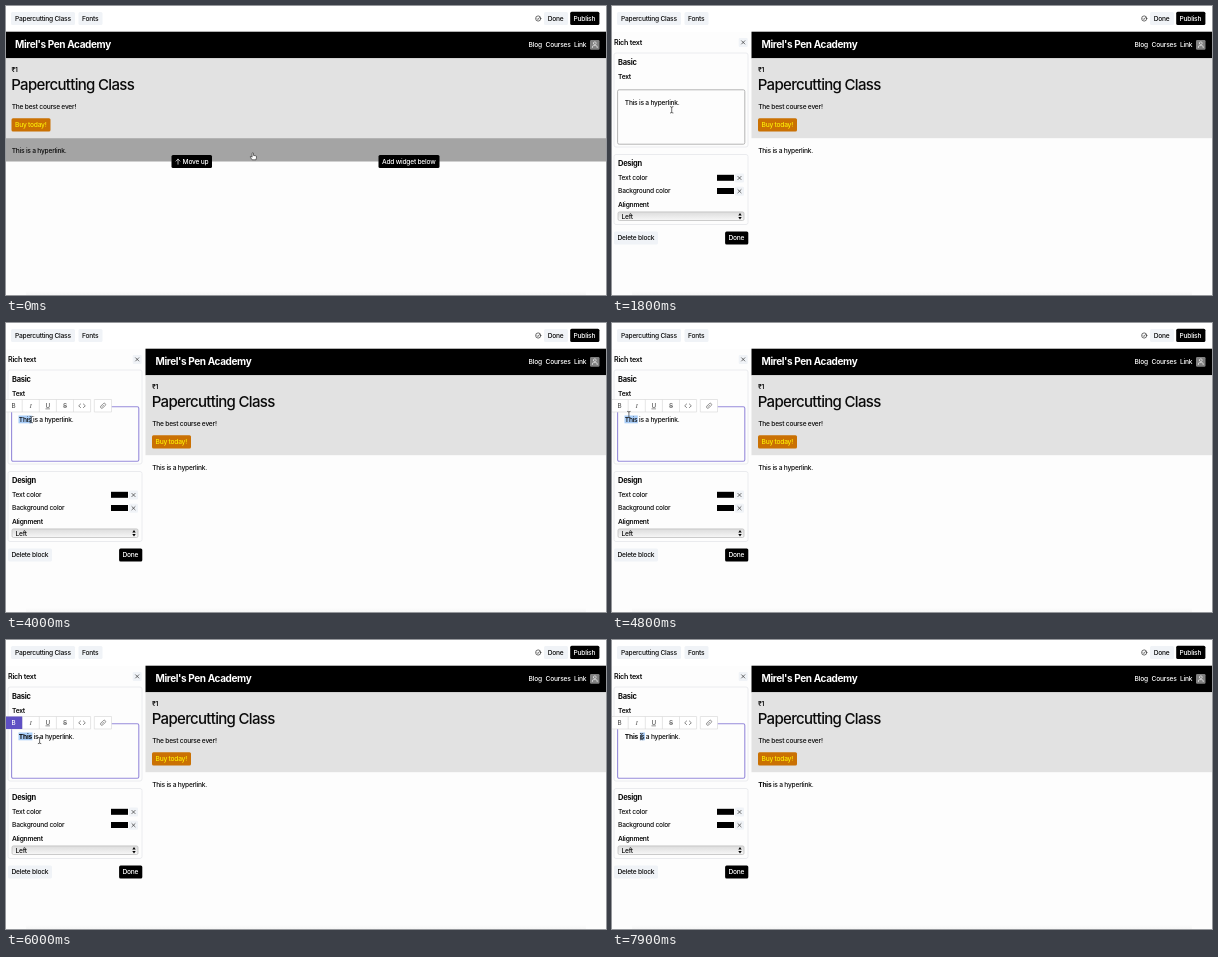
Recreate the animation shown at these times as an HTML page. Size 600 by 289 pixels, loop 8 s.

```html
<!DOCTYPE html>
<html lang="en">
<head>
<meta charset="utf-8">
<title>Page editor</title>
<style>
  html, body { margin: 0; width: 100%; height: 100%; overflow: hidden; background: #fdfdfd; }
  svg { display: block; width: 600px; height: 289px; }
  text { font: 500 6.67px Inter, "DejaVu Sans", sans-serif; letter-spacing: -.035em; fill: #0a0a0a; white-space: pre; }
  .w { fill: #fff; }
  .b { font-weight: 600; }
  .h { font-weight: 700; font-size: 7.5px; }
  .bold { font-weight: 700; }
  .brand { font-weight: 700; font-size: 10px; letter-spacing: -.038em; }
  .title { font-weight: 450; font-size: 15px; letter-spacing: -.045em; }
  .tip { font-size: 4.3px; font-weight: 600; }
  .chip { fill: #f0f3f7; }
  .card { fill: none; stroke: #e6e8eb; stroke-width: .8; }
  .line { fill: none; stroke: #333; stroke-width: .7; stroke-linecap: round; stroke-linejoin: round; }
  .tool { fill: none; stroke: #dcdcdc; stroke-width: .7; }
  .tools text { text-anchor: middle; fill: #555; font-size: 6.3px; }
  .tools .italic { font-family: "Liberation Serif", serif; font-style: italic; font-size: 7px; }
  .sel { fill: #a8cdf8; }
</style>
</head>
<body>
<svg viewBox="0 0 600 289">
  <defs>
    <linearGradient id="foot" x2="0" y2="1">
      <stop stop-color="#fdfdfd"/><stop offset="1" stop-color="#f6f6f6"/>
    </linearGradient>
    <linearGradient id="field" x2="0" y2="1">
      <stop stop-color="#dcdcdc"/><stop offset="1" stop-color="#f7f7f7"/>
    </linearGradient>
    <g id="clear">
      <rect class="chip" x="-4.5" y="-4.5" width="9" height="9" rx="1.2"/>
      <path class="line" d="M-1.6-1.6 1.6 1.6M1.6-1.6-1.6 1.6"/>
    </g>
  </defs>

  <rect width="600" height="289" fill="#fdfdfd"/>
  <rect x="20" y="285" width="560" height="4" fill="url(#foot)"/>

  <!-- top bar -->
  <rect width="600" height="26" fill="#fff"/>
  <rect class="chip" x="5" y="6" width="64" height="13" rx="1.5"/>
  <text x="9" y="15">Papercutting Class</text>
  <rect class="chip" x="72.5" y="6" width="24" height="13" rx="1.5"/>
  <text x="76" y="15">Fonts</text>
  <circle class="line" cx="532.2" cy="12.5" r="2.6"/>
  <path class="line" d="M531 12.6l.9.9 1.5-1.9"/>
  <rect class="chip" x="538" y="6" width="24" height="13" rx="1.5"/>
  <text x="541.7" y="15">Done</text>
  <rect x="564.2" y="5.8" width="29.2" height="13.2" rx="1.5"/>
  <text class="w" x="567.5" y="15">Publish</text>

  <!-- page preview -->
  <g id="page">
    <rect x="-1" y="25.7" width="602" height="26.6"/>
    <text class="brand w" x="9" y="42.4">Mirel's Pen Academy</text>
    <rect x="-1" y="52.3" width="602" height="79.9" fill="#e2e2e2"/>
    <text class="b" x="5.6" y="66.3">₹1</text>
    <text class="title" x="5.2" y="84.4">Papercutting Class</text>
    <text x="5.7" y="103">The best course ever!</text>
    <rect x="5.5" y="112.2" width="39" height="13.3" rx="1.5" fill="#ca7103"/>
    <text x="9" y="121.4" style="fill:#fdee05">Buy today!</text>
    <rect id="hover" x="-1" y="132.2" width="602" height="23.3" fill="#a4a4a4"/>
    <text x="5.7" y="146.5"><tspan id="shown">This</tspan> is a hyperlink.</text>
  </g>
  <text class="w" x="522.6" y="41.4">Blog</text>
  <text class="w" x="539.6" y="41.4">Courses</text>
  <text class="w" x="568" y="41.4">Link</text>
  <rect x="584" y="34" width="9.5" height="9.7" rx="1.2" fill="#808080"/>
  <path class="line" style="stroke:#eee" d="M586.4 41.6v-.6q0-1.4 1.4-1.4h2q1.4 0 1.4 1.4v.6M587.4 37.2a1.4 1.4 0 1 0 2.8 0a1.4 1.4 0 1 0-2.8 0"/>

  <g id="actions">
    <rect x="165.5" y="149" width="40.5" height="13" rx="1.5"/>
    <path class="line" style="stroke:#fff" d="M172 158.2v-5M170 155.1l2-2 2 2"/>
    <text class="w" x="176.6" y="158">Move up</text>
    <rect x="372.5" y="149" width="61" height="13" rx="1.5"/>
    <text class="w" x="376" y="158">Add widget below</text>
  </g>

  <!-- settings panel -->
  <g id="panel">
    <text class="b" x="2" y="38.8" style="font-size:7.2px">Rich text</text>
    <use href="#clear" x="131.2" y="36.4"/>
    <rect class="card" x="2" y="47" width="134" height="94" rx="2"/>
    <text class="h" x="6" y="59">Basic</text>
    <text class="b" x="6" y="73.3">Text</text>
    <rect id="box" x="5.6" y="83.8" width="127.2" height="54.4" rx="1.5" fill="#fdfdfd"/>
    <rect id="sel" class="sel" y="92.5" height="7.8"/>
    <text x="12.8" y="98.5"><tspan id="typed">This</tspan> is a hyperlink.</text>

    <rect class="card" x="2" y="148.5" width="134" height="70" rx="2"/>
    <text class="h" x="6" y="159.9">Design</text>
    <text x="6" y="174.1">Text color</text>
    <rect x="105" y="168.8" width="17" height="6"/>
    <use href="#clear" x="127.5" y="172"/>
    <text x="6" y="187.4">Background color</text>
    <rect x="105" y="182" width="17" height="6"/>
    <use href="#clear" x="127.5" y="185.2"/>
    <text class="b" x="6" y="201">Alignment</text>
    <rect x="6" y="205.9" width="126" height="8.6" rx="1.5" fill="url(#field)" stroke="#b8b8b8" stroke-width=".7"/>
    <text x="9.5" y="212.6">Left</text>
    <path d="M126.3 209.6l1.7-2.6 1.7 2.6zM126.3 210.9l1.7 2.6 1.7-2.6z"/>
    <rect class="chip" x="2" y="225.5" width="44" height="13" rx="1.5"/>
    <text x="5.5" y="234.4">Delete block</text>
    <rect x="113.1" y="225.5" width="23.2" height="13.1" rx="1.5"/>
    <text class="w" x="116.4" y="234.4">Done</text>

    <g id="tools" class="tools">
      <rect x="-1" y="76.5" width="106.5" height="12.5" fill="#fff"/>
      <path class="tool" d="M-1 76.5H84.6V89H-1zM16.2 76.5V89M33.3 76.5V89M50.4 76.5V89M67.5 76.5V89M88.3 76.5h17.2V89H88.3z"/>
      <rect id="active" y="76.5" width="16.2" height="12.5" fill="#5f50c4"/>
      <text id="bee" x="7.4" y="85.1">B</text>
      <text class="italic" x="24.6" y="85.1">I</text>
      <text x="41.7" y="84.6" text-decoration="underline">U</text>
      <text x="58.9" y="85.1" text-decoration="line-through">S</text>
      <path class="line" style="stroke:#555" d="M74.6 81l-1.9 1.8 1.9 1.8M77.4 81l1.9 1.8-1.9 1.8"/>
      <path class="line" style="stroke:#666" d="M96.4 83.4l1.3-1.3M96.3 81.6l1-1a1.3 1.3 0 0 1 1.9 1.9l-1 1M97.8 83.9l-1 1a1.3 1.3 0 0 1-1.9-1.9l1-1"/>
    </g>
    <g id="tip">
      <rect x="-2" y="94.7" width="29" height="9.5" rx="1.5" fill="#444"/>
      <text class="tip w" x="2.2" y="101">Bold (⌘B)</text>
    </g>
  </g>

  <path id="hand" fill="#fff" stroke="#222" stroke-width=".6" stroke-linejoin="round"
    d="M-.7.2Q0-.6.7.2V2.4l2.2.4q.9.2.9 1.2L3.2 6.8H-.6L-2.5 4.2q-.3-.9.7-.8L-.7 4.2z"/>
  <path id="beam" class="line" d="M-1.3-3.2Q0-3.2 0-2.4Q0-3.2 1.3-3.2M0-2.4V2.4M-1.3 3.2Q0 3.2 0 2.4Q0 3.2 1.3 3.2"/>
</svg>
<script>
const $ = id => document.getElementById(id);
const show = (id, on) => $(id).style.display = on ? '' : 'none';
const set = (id, attrs) => { for (const k in attrs) $(id).setAttribute(k, attrs[k]); };

// pointer hot spot: time, x, y
const path = [
  [0, 246.8, 147], [100, 247.8, 147], [1799, 247.8, 147], [1800, 59.7, 103.8],
  [2600, 13, 96.6], [3100, 13, 96.6], [3900, 25.3, 96.6], [4299, 25.3, 96.6],
  [4300, 24, 96.6], [4400, 24, 96.6], [5200, 9.8, 86.6], [5400, 9.8, 86.6],
  [6200, 38, 103], [6700, 34.3, 98.6], [7000, 33.4, 96.6], [7300, 33.4, 96.6],
  [7800, 29.6, 96.6], [8000, 29.6, 96.6]
];

function pointer(t) {
  const i = path.findIndex(p => p[0] > t);
  const [a, b] = [path[i - 1], path[i]];
  const k = (t - a[0]) / (b[0] - a[0]);
  const e = k * k * (3 - 2 * k);
  return [a[1] + (b[1] - a[1]) * e, a[2] + (b[2] - a[2]) * e];
}

function draw(t) {
  const open = t >= 1800, focus = t >= 2700, bold = t >= 5200, again = t >= 7300;
  const [x, y] = pointer(t);

  $('page').setAttribute('transform', `translate(${open ? 140.5 : 0})`);
  show('panel', open);
  show('hover', !open);
  show('actions', !open);
  $('shown').setAttribute('class', again ? 'bold' : '');
  $('typed').setAttribute('class', bold ? 'bold' : '');
  set('box', { stroke: focus ? '#968bda' : '#a2a2a2', 'stroke-width': focus ? 1.1 : .8 });

  let from = 12.5, to = 12.5;
  if (again) [from, to] = [Math.max(28, x - 1.6), 33];
  else if (t > 3100) to = bold ? 26.4 : t < 3900 ? x : 25.8;
  set('sel', { x: from, width: Math.max(0, to - from) });

  show('tools', t >= 3500 && !(t >= 7300 && t < 7600));
  show('active', bold && !again);
  $('bee').style.fill = bold && !again ? '#fff' : '';
  show('tip', t >= 5100 && t < 5700);

  const hand = !open || (t > 4500 && t < 6200 && y < 90);
  show('hand', hand);
  show('beam', !hand);
  set(hand ? 'hand' : 'beam', { transform: `translate(${x} ${y})` });
}

function tick() {
  draw(Math.floor(performance.now() % 8000 / 100) * 100);
  requestAnimationFrame(tick);
}
tick();
</script>
</body>
</html>
```
